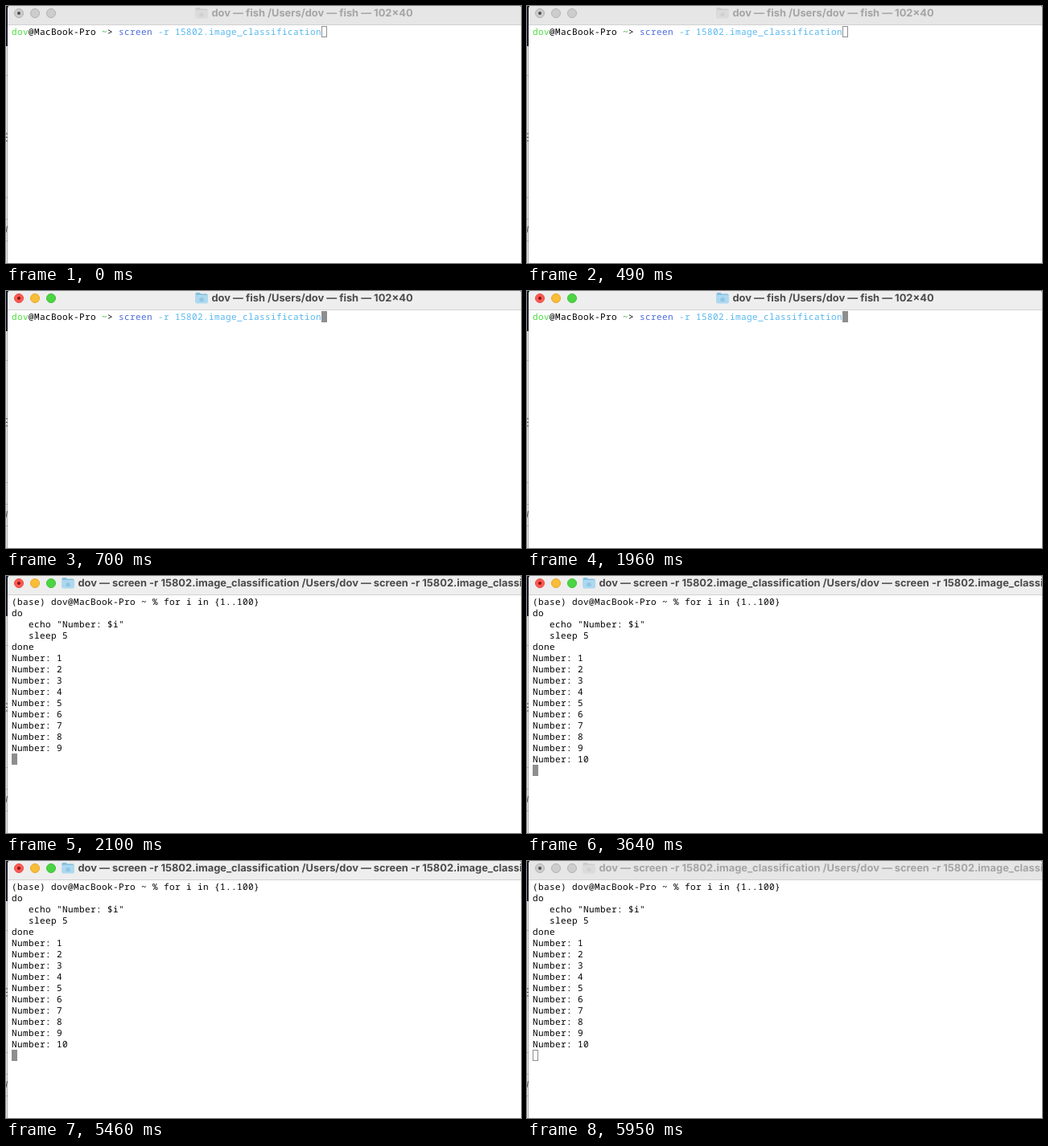
Recreate the animation shown at these times as an HTML page. Size 640 by 320 pixels, loop 6020 ms.

```html
<!DOCTYPE html>
<html lang="en">
<head>
<meta charset="utf-8">
<title>Terminal</title>
<style>
  html, body { margin: 0; width: 100%; height: 100%; overflow: hidden; background: #fff; }
  svg { display: block; }
  text { white-space: pre; text-rendering: geometricPrecision; }
  #screen { font: 500 11px "Noto Sans Mono", "DejaVu Sans Mono", monospace; letter-spacing: .4px; }
  #title { font: 700 12.88px Inter, Arial, sans-serif; fill: #4b4b4b; }
  #bar { fill: #eee; }
  #cursor { fill: #8e8e8e; stroke: #8e8e8e; }
  .user { fill: #48dd3c; }
  .tilde { fill: #35b82e; }
  .cmd { fill: #4a6bdc; }
  .arg { fill: #56b7ee; }
  .dot { fill: #8c1009; }
  .inactive #bar { fill: #e5e6e5; }
  .inactive #title { fill: #a4a5a4; }
  .inactive #cursor { fill: #fff; }
  .inactive .light { fill: #cdcdcd; stroke: #b2b2b2; }
  .inactive .dot { fill: #4e4e4e; }
  .inactive #folder { filter: grayscale(1); opacity: .5; }
</style>
</head>
<body>
<svg id="stage" width="640" height="320" viewBox="0 0 640 320">
  <!-- sliver of the window behind -->
  <rect width="3" height="320" fill="#ececec"/>
  <rect width="3" height="50" fill="#1d2030"/>
  <path d="M0 86.5h2M0 238.5h2M0 265.5h2M0 292.5h2" stroke="#b9b9b9"/>
  <path d="M0 159h2M0 163.5h2M0 168h2M0 282l1.5-8" stroke="#555"/>
  <rect x="639" width="1" height="2" fill="#777"/>

  <path d="M2 320V4Q2 0 6 0H637Q640 0 640 3V320" fill="#fff"/>
  <path id="bar" d="M2 23V4Q2 0 6 0H637Q640 0 640 3V23Z"/>
  <path d="M2 23.5H640" stroke="#d2d2d2"/>
  <path d="M1.5 3V320" stroke="#0004"/>

  <circle class="light" cx="16" cy="9" r="5.5" fill="#fc5b54" stroke="#ea4c46"/>
  <circle class="dot" cx="16" cy="9" r="2"/>
  <circle class="light" cx="36" cy="9" r="5.5" fill="#f9bd38" stroke="#e6a72c"/>
  <circle class="light" cx="56" cy="9" r="5.5" fill="#4bd543" stroke="#3ebd38"/>

  <g id="folder">
    <path d="M.5 13V3Q.5 1.5 2 1.5H5.5L7 3H14Q15.5 3 15.5 4.5V13Z" fill="#86bfde"/>
    <rect x=".5" y="4.5" width="15" height="10.5" rx="1.3" fill="#acd9f0"/>
    <path d="M4.5 10L8 7L11.5 10H10.5V12.5H5.5V10Z" fill="#8fc5e2"/>
  </g>
  <text id="title" y="13.3"></text>
  <g id="screen"></g>
  <rect id="cursor" width="6" height="13"/>
</svg>
<script>
const LOOP = 6020, FOCUS = 630, ATTACH = 2030, RETITLE = 2100, TEN = 3640, BLUR = 5950;
const USER = "dov", JOB = "15802.image_classification";
const $ = id => document.getElementById(id);
const span = (cls, text) => `<tspan class="${cls}">${text}</tspan>`;

const prompt = span("user", USER) + "@MacBook-Pro " + span("tilde", "~") + "&gt; " +
  span("cmd", "screen") + span("arg", ` -r ${JOB}`);
const script = [`(base) ${USER}@MacBook-Pro ~ % for i in {1..100}`,
  "do", '   echo "Number: $i"', "   sleep 5", "done"];

const output = count =>
  [...script, ...Array.from({ length: count }, (_, i) => `Number: ${i + 1}`)];

function setTitle(task, x) {
  $("title").textContent = `${USER} — ${task} /Users/${USER} — ${task} — 102×40`;
  $("title").setAttribute("x", x + .5);
  $("folder").setAttribute("transform", `translate(${x - 20} .5)`);
}

function setScreen(lines, col, row) {
  $("screen").innerHTML = lines.map((line, i) =>
    `<text x="7" y="${36 + 14 * i}">${line}</text>`).join("");
  $("cursor").setAttribute("x", 7.5 + 7 * col);
  $("cursor").setAttribute("y", 25.5 + 14 * row);
}

let shown;
function draw(now) {
  const t = now % LOOP;
  const phase = [FOCUS, ATTACH, RETITLE, TEN, BLUR].filter(start => t >= start).length;
  if (phase !== shown) {
    shown = phase;
    $("stage").classList.toggle("inactive", t < FOCUS || t >= BLUR);
    if (t < RETITLE) setTitle("fish", 255);
    else setTitle(`screen -r ${JOB}`, 89);
    if (t < ATTACH) setScreen([prompt], 55, 0);
    else {
      const lines = output(t < TEN ? 9 : 10);
      setScreen(lines, 0, lines.length);
    }
  }
  requestAnimationFrame(draw);
}
draw(performance.now());
</script>
</body>
</html>
```
